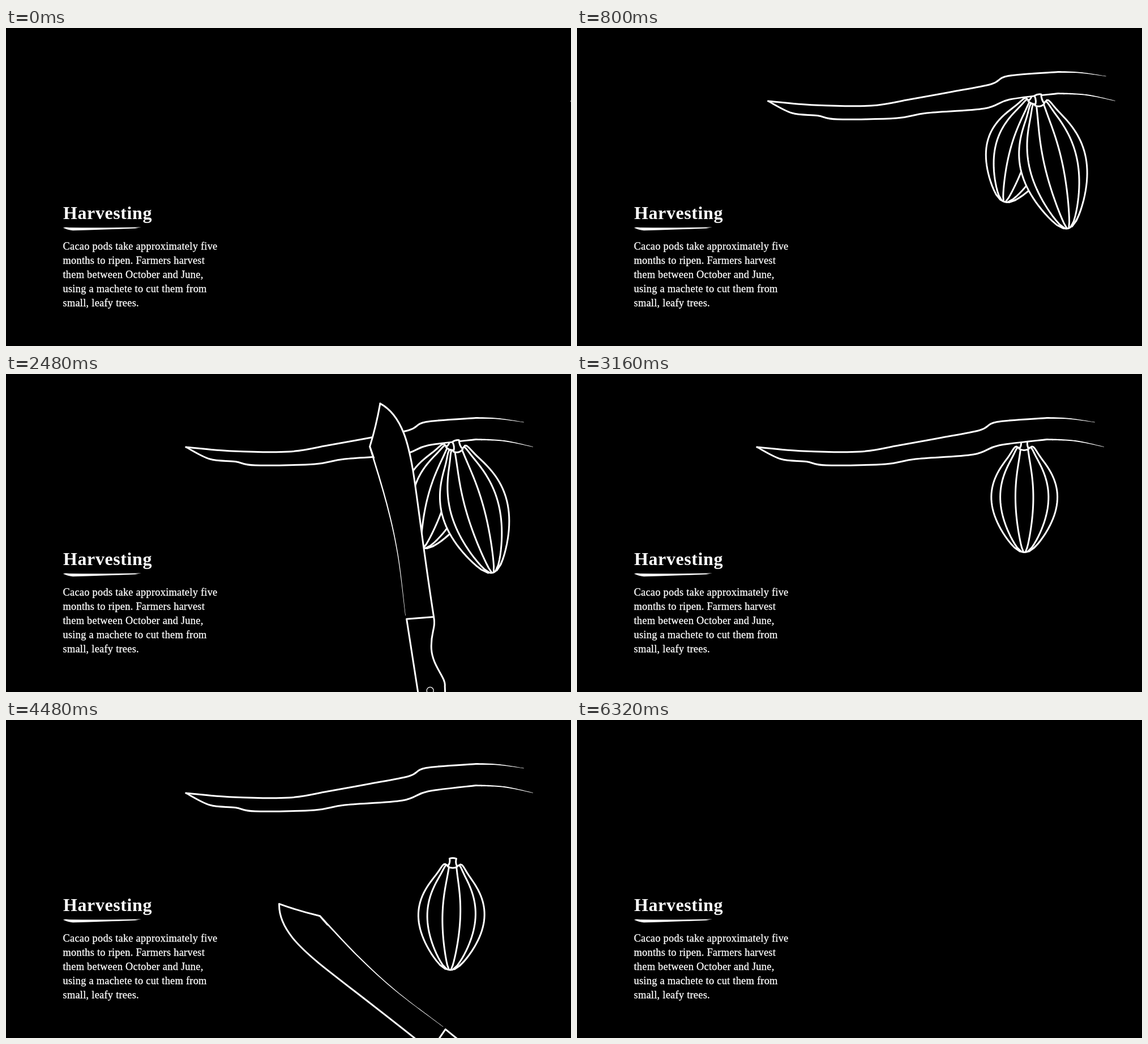
An HTML page that plays this animation: 998 px wide and 561 px high, repeating every 6.96 s.

```html
<!DOCTYPE html>
<html lang="en">
<head>
<meta charset="utf-8">
<title>Harvesting</title>
<style>
  html, body { margin: 0; width: 100%; height: 100%; overflow: hidden; background: #000; }
  svg { display: block; width: 100%; height: 100%; }
  path, circle { fill: none; stroke: #fff; stroke-width: 3; stroke-linecap: round; stroke-linejoin: round; vector-effect: non-scaling-stroke; }
  .mask { fill: #000; stroke: none; }
  .ink { fill: #000; }
  .solid { fill: #fff; stroke: none; }
  .thin { stroke-width: 1.3; }
  text { font-family: "Liberation Serif", "Times New Roman", serif; fill: #fff; stroke: #fff; }
  .title { font-size: 32px; font-weight: 700; letter-spacing: .6px; stroke-width: 0; }
  .body { font-size: 18.4px; letter-spacing: .25px; stroke-width: .3px; }
</style>
</head>
<body>
<svg id="stage" viewBox="0 0 998 561" preserveAspectRatio="none">
  <text class="title" x="101" y="337">Harvesting</text>
  <path class="solid" d="M101 352.5Q104 351 112 352Q170 353 239 351.3L228 353L234 353.3Q170 356 118 357.2Q108 356 101 352.5Z"/>
  <g id="copy"></g>
  <g id="bough"></g>
</svg>
<script>
const LOOP = 6960;
const PI = Math.PI;
const stage = document.getElementById('stage');
const bough = document.getElementById('bough');

function add(parent, tag, attrs = {}) {
  const el = document.createElementNS('http://www.w3.org/2000/svg', tag);
  for (const k in attrs) el.setAttribute(k, attrs[k]);
  return parent.appendChild(el);
}
const line = (parent, d, cls = '') => add(parent, 'path', { d, class: cls });

// ---- curves ----
const points = s => s.split(' ').map(p => p.split(',').map(Number));
const back = pts => [...pts].reverse();
const flip = pts => pts.map(([x, y]) => [-x, y]);

// Catmull-Rom curve through the points
function spline(pts, start = 'M') {
  let d = start + pts[0];
  for (let i = 0; i < pts.length - 1; i++) {
    const a = pts[i - 1] || pts[i], b = pts[i], c = pts[i + 1], e = pts[i + 2] || c;
    d += `C${b[0] + (c[0] - a[0]) / 6},${b[1] + (c[1] - a[1]) / 6} ` +
         `${c[0] - (e[0] - b[0]) / 6},${c[1] - (e[1] - b[1]) / 6} ${c}`;
  }
  return d;
}

// Brush line that narrows from width (w, h) to a hair
function taper(parent, pts, w, h) {
  const side = s => pts.map(([x, y], i) => {
    const k = s * (1 - .8 * i / (pts.length - 1)) / 2;
    return [x + w * k, y + h * k];
  });
  line(parent, spline(side(1)) + spline(back(side(-1)), 'L') + 'Z', 'solid');
}

// ---- shapes ----
// One ridge of a pod; k runs from 0 (axis) to 1 (outline)
function ridge(k) {
  return Array.from({ length: 41 }, (_, i) => {
    const v = (i / 40) ** 1.5;
    const bulge = 58 * Math.max(0, Math.sin(PI * v ** .9)) ** .75 + 8 * v ** 4;
    const shoulder = 7 * k * 50 * v * Math.exp(1 - 50 * v);
    return [k * bulge + (4 + 4 * k) * (1 - v) ** 12, 15 + 181 * v - shoulder];
  });
}

function pod(stretch) {
  const holder = add(bough, 'g');
  const g = add(holder, 'g', { transform: `scale(1,${stretch})` });
  for (const k of [1, .73, .27]) {
    const r = ridge(k);
    line(g, 'M' + r.join('L') + 'L' + back(flip(r)).join('L') + 'Z', 'mask');
    line(g, 'M' + r.join('L') + 'M' + flip(r).join('L'));
  }
  line(g, 'M-10 194Q0 201 10 194');
  line(g, 'M36 165Q28 179 14 191', 'thin');
  line(g, 'M-6 1Q0 -1 6 1Q4 9 8 15Q0 20 -9 15Q-4 9 -6 1Z', 'ink');
  return holder;
}

function branch() {
  const top = points('318,129 400,136 500,137 568,126 640,113 712,99 742,84.5 830,77.5');
  const low = points('318,129 360,150 405,154.5 440,161 545,159 598,150 700,142 745,126 830,115.5');
  line(bough, spline(top) + spline(back(low), 'L') + 'Z', 'mask');
  line(bough, spline(top));
  line(bough, spline(low));
  taper(bough, points('830,77.5 870,78.8 915,85'), 0, 3);
  taper(bough, points('830,115.5 880,118 931,128.5'), 0, 3);
}

// Drawn around a pivot in the handle
function knife() {
  const holder = add(stage, 'g');
  const g = add(holder, 'g', { transform: 'translate(-750,-560)' });
  const belly = 'M660 52C702 74 712 135 718 168S740 330 756 428';
  const spine = points('642,128 672,228 692,318 706,426');
  line(g, belly + 'L708 432' + spline(back(spine), 'L') + 'Z', 'mask');
  line(g, belly);
  line(g, 'M660 52Q653 92 642 128L649 148');
  taper(g, spine, 3, 0);
  line(g, 'M756 428C760 450 750 455 752 485S778 535 776 550L780 650L744 658L708 432Z', 'ink');
  add(g, 'circle', { cx: 750, cy: 558, r: 6, class: 'thin' });
  return holder;
}

// ---- motion, all as functions of the time in ms ----
const clamp = u => Math.min(1, Math.max(0, u));
const since = (t, t0) => Math.max(0, t - t0);
const decay = (t, rate) => Math.exp(-rate * t);
const turn = (t, period) => 2 * PI * t / period;

// Cosine easing between a few [ms, value] stops
function ease(t, stops) {
  let v = stops[0][1];
  for (let i = 1; i < stops.length; i++) {
    const [t0, a] = stops[i - 1], [t1, b] = stops[i];
    v += (b - a) * (1 - Math.cos(PI * clamp((t - t0) / (t1 - t0)))) / 2;
  }
  return v;
}

function place(el, x, y, angle, scale = '') {
  el.setAttribute('transform', `translate(${x},${y}) rotate(${angle}) ${scale}`);
}

const HALT = 440;                       // the branch stops and the pods swing on
const CUT = [2480, 4180];               // blade passes its upright pose
const DROP = [2520, 4320];              // pods come loose
const GRAVITY = .00488;

const slide = t => ease(t, [[140, 681], [HALT, -86], [690, 40], [910, 0], [5590, 0], [5840, 52], [6340, -945]]);

function bigPod(t) {
  const s = since(t, HALT), f = since(t, DROP[0]);
  const angle = -15.75 + 30 * decay(s, .004) * Math.sin(turn(s, 840));
  place(big, 794 + f * .02, 117 + GRAVITY * f * f, angle - f * .03);
}

// Leans on the big pod until that one is cut off
function smallPod(t) {
  const s = since(t, HALT), free = since(t, DROP[0]), f = since(t, DROP[1]);
  const lean = free
    ? 16.5 * decay(free, .0033) * Math.cos(turn(free, 360)) - .5
    : 16 + 14 * decay(s, .004) * Math.sin(turn(s, 360));
  place(small, 790 - f * .003, 117 + GRAVITY * f * f, lean + f * .013);
}

// Rise from below, wind up, slash at a steady rate, drop away
function chop(el, t, start, cut, x, y, side, size) {
  const u = clamp((t - start) / (cut - start)), s = since(t, cut);
  const rise = 540 * (1 - clamp((t - start) / 420)) ** 3;
  const angle = -7 * Math.sin(PI * u * u) + Math.min(64, .2 * s);
  const sink = .42 * s + .003 * since(s, 280) ** 2;
  place(el, x + side * .17 * s, y + rise + sink, side * angle, `scale(${side * size},${size})`);
}

[
  'Cacao pods take approximately five',
  'months to ripen. Farmers harvest',
  'them between October and June,',
  'using a machete to cut them from',
  'small, leafy trees.'
].forEach((s, i) => {
  add(document.getElementById('copy'), 'text', { class: 'body', x: 100.5, y: 391 + 25 * i }).textContent = s;
});

const small = pod(1);
branch();
const big = pod(1.228);
const first = knife();
const second = knife();

function draw(now) {
  const t = now % LOOP;
  place(bough, slide(t), 0, 0);
  bigPod(t);
  smallPod(t);
  chop(first, t, 1825, CUT[0], 749, 560, 1, 1);
  chop(second, t, 3630, CUT[1], 914, 514, -1, .96);
}

function tick() {
  draw(performance.now());
  requestAnimationFrame(tick);
}
tick();
</script>
</body>
</html>
```
